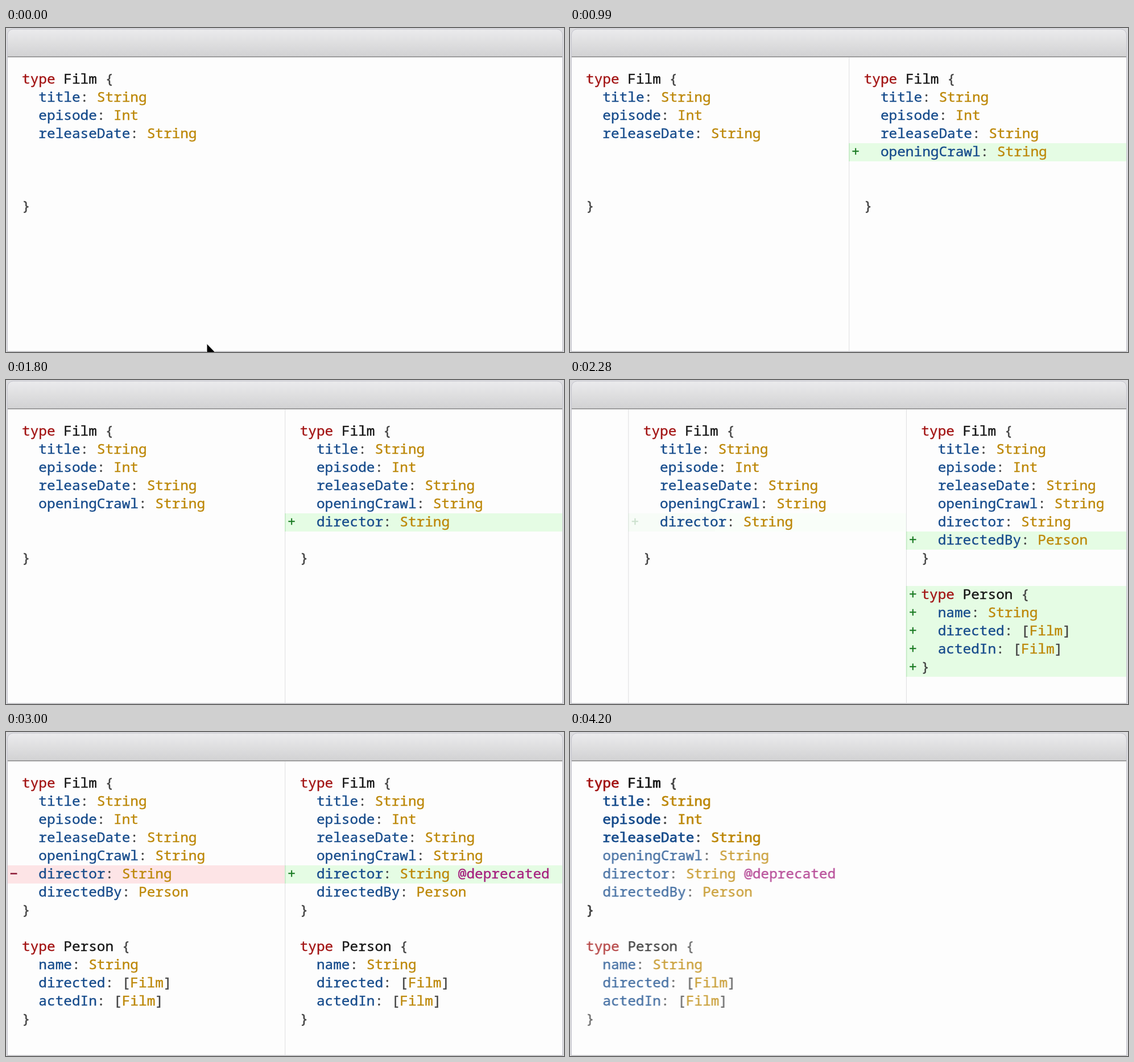
Animation, 981 px wide and 571 px high, one loop 4.23 s. Source, as an HTML page:

```html
<!DOCTYPE html>
<html lang="en">
<head>
<meta charset="utf-8">
<title>Schema evolution</title>
<style>
  html, body { margin: 0; width: 100%; height: 100%; overflow: hidden; background: #dcdcdf; }
  svg { display: block; }
  text {
    font: 24.4px "Roboto Mono", "Noto Sans Mono", monospace;
    color: #444; fill: currentColor; stroke: currentColor; stroke-width: .4;
  }
  tspan { fill: currentColor; stroke: currentColor; }
  .key { color: #a31515; }
  .name { color: #161616; }
  .field { color: #174c8c; }
  .kind { color: #bd8809; }
  .note { color: #a6217f; }
  .sign { font-weight: 500; text-anchor: middle; }
  .add rect { fill: #e5fce4; }
  .add .edge { fill: #c0e8c2; }
  .add .sign { color: #197a22; }
  .cut rect { fill: #fde4e6; }
  .cut .edge { fill: #f6cdd3; }
  .cut .sign { color: #8a1734; }
</style>
</head>
<body>
<svg width="981" height="571" viewBox="0 0 981 571">
  <defs>
    <linearGradient id="bar" gradientUnits="userSpaceOnUse" x1="0" y1="2" x2="0" y2="50">
      <stop stop-color="#ebebed"/>
      <stop offset="1" stop-color="#d2d2d3"/>
    </linearGradient>
    <clipPath id="view"><rect x="3" y="52" width="975" height="518"/></clipPath>
  </defs>
  <path d="M2.5 571V12a10 10 0 0 1 10-10H968.5a10 10 0 0 1 10 10V571" fill="url(#bar)" stroke="#c3c3cc"/>
  <rect x="3" y="51" width="975" height="519" fill="#fdfdfd"/>
  <rect x="3" y="50" width="975" height="1.5" fill="#858585"/>
  <rect x="2" y="569.5" width="977" height="1.5" fill="#bcbcc0"/>
  <g id="strip" clip-path="url(#view)"></g>
  <path id="cursor" d="M353 556V579L358.5 574L369 572.5Z" stroke="#fff"/>
</svg>
<script>
const LOOP = 4230, SLIDE = 400, WIDTH = 488.6, LEFT = 1.6, CHAR = 14.64;
const starts = [540, 1270, 2001, 2600, 3317, 4082];

const base = { 0: 'type Film {', 1: '  title: String', 2: '  episode: Int', 3: '  releaseDate: String', 7: '}' };
const crawl = { 4: '  openingCrawl: String' };
const director = { 5: '  director: String' };
const person = {
  6: '  directedBy: Person', 9: 'type Person {', 10: '  name: String',
  11: '  directed: [Film]', 12: '  actedIn: [Film]', 13: '}'
};
const deprecated = { 5: '  director: String @deprecated' };
const edits = [base, crawl, director, person, deprecated];

const rowTop = row => 75 + 32 * row;
const baseline = row => rowTop(row) + 23.4;

const paint = line => line.replace(/(type) (\w+)|(\w+)(?=:)|(@\w+)|(\w+)/g,
  (all, key, name, field, note) => {
    const span = (cls, s) => `<tspan class="${cls}">${s}</tspan>`;
    if (key) return span('key', key) + ' ' + span('name', name);
    return span(field ? 'field' : note ? 'note' : 'kind', all);
  });

function codeLine([row, line]) {
  const text = line.trimStart(), indent = line.length - text.length;
  return `<text x="${26.5 + indent * CHAR}" y="${baseline(row)}">${paint(text)}</text>`;
}

const mark = (rows, sign, cls) => `<g class="${cls}">` + rows.map(row => `
  <rect y="${rowTop(row)}" width="${WIDTH}" height="32"/>
  <rect class="edge" y="${rowTop(row)}" width="1.5" height="32"/>
  <text class="sign" x="12" y="${baseline(row)}">${sign}</text>`).join('') + '</g>';

const strip = document.getElementById('strip');
const cursor = document.getElementById('cursor');
let lines = {};
strip.innerHTML = edits.map((edit, i) => {
  lines = { ...lines, ...edit };
  return `<g><rect y="51" width="1" height="520" fill="#dedee0"/>` +
    (i ? mark(Object.keys(edit), '+', 'add') : '') +
    (i === 3 ? mark([5], '−', 'cut') : '') +
    Object.entries(lines).map(codeLine).join('') + '</g>';
}).join('');
const panels = [...strip.children];

const ease = x => (1 - Math.cos(Math.PI * Math.min(1, Math.max(0, x)))) / 2;

function draw(now) {
  const t = now % LOOP;
  const p = starts.map(s => ease((t - s) / SLIDE));
  const fade = p[5];
  const pos = p.slice(0, 5).reduce((a, b) => a + b);

  panels.forEach((panel, i) => {
    // The first panel stays put while the second one enters.
    const slot = i ? i + 1 - pos : fade ? 0 : Math.min(0, 1 - pos);
    panel.setAttribute('transform', `translate(${LEFT + WIDTH * slot})`);
    const add = panel.querySelector('.add');
    if (add) add.setAttribute('opacity', 1 - p[i]);
  });
  strip.querySelector('.cut').setAttribute('opacity', p[3]);
  panels[0].setAttribute('opacity', fade ? Math.min(1, fade * 5) : 1);
  panels[4].setAttribute('opacity', 1 - fade);

  cursor.setAttribute('transform', `translate(0 ${t * 0.2})`);
  cursor.setAttribute('visibility', t < 90 ? 'visible' : 'hidden');
}

const begin = performance.now();
function tick() {
  draw(performance.now() - begin);
  requestAnimationFrame(tick);
}
tick();
</script>
</body>
</html>
```
